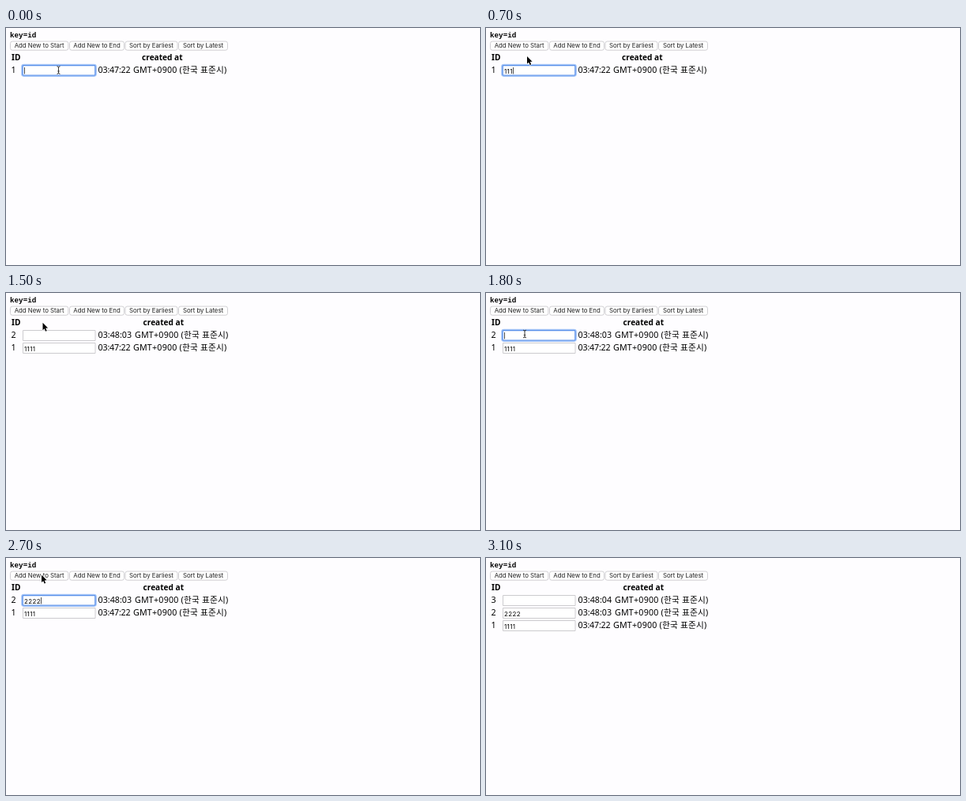
An HTML page with a canvas that plays this animation: 600 px wide and 301 px high, repeating every 4.1 s.

```html
<!DOCTYPE html>
<html lang="en">
<head>
<meta charset="utf-8">
<title>key=id</title>
<style>
  html, body { margin: 0; width: 100%; height: 100%; overflow: hidden; background: #fefdff; }
  canvas { display: block; width: 100vw; height: 100vh; }
</style>
</head>
<body>
<canvas id="stage"></canvas>
<script>
const W = 600, H = 301, LOOP = 4100;
const BG = '#fefdff';
const SANS = '"Noto Sans", "Noto Sans CJK KR", sans-serif';
const UI = 'Inter, sans-serif';
const BODY = '500 10.7px ' + SANS;
const HEAD = 'bold 10.1px ' + SANS;
const canvas = document.getElementById('stage');
const ctx = canvas.getContext('2d');
const scale = window.devicePixelRatio || 1;
canvas.width = Math.round(W * scale);
canvas.height = Math.round(H * scale);

const buttons = [
  ['Add New to Start', 5, 74.3],
  ['Add New to End', 80, 70],
  ['Sort by Earliest', 150.5, 67],
  ['Sort by Latest', 218, 63]
];

// Each row: id, time of day, x of the zone text
const rows = [
  { id: '1', time: '03:47:22', zoneX: 161, tracking: -0.2 },
  { id: '2', time: '03:48:03', zoneX: 163, tracking: 0 },
  { id: '3', time: '03:48:04', zoneX: 163, tracking: 0 }
];

// Start time, pointer kind, x, y
const pointer = [
  [0, 'beam', 66.5, 53.5], [300, 'beam', 66, 53], [400, 'beam', 63, 52],
  [500, 'arrow', 58, 45], [600, 'arrow', 54, 39], [700, 'arrow', 52, 36],
  [800, 'arrow', 50, 33], [900, 'arrow', 47, 27], [1000, 'arrow', 45, 23],
  [1100, 'arrow', 45, 21.6], [1500, 'arrow', 46.5, 37.8], [1600, 'arrow', 48, 45],
  [1700, 'beam', 49, 52], [2400, 'beam', 49, 49], [2500, 'arrow', 48, 39],
  [2600, 'arrow', 46, 28], [2700, 'arrow', 45, 21.6], [3100, 'none', 0, 0]
];

// Start times of the typed digits, by row
const keys = [[400, 500, 700, 900], [2000, 2200, 2300, 2400], []];

const ADD_2 = 1200, ADD_3 = 2900, PRESS = 2800;

function text(str, x, y, font, { color = '#000', align = 'left', tracking = 0 } = {}) {
  ctx.font = font;
  ctx.fillStyle = color;
  ctx.textAlign = align;
  ctx.letterSpacing = tracking + 'px';
  ctx.fillText(str, x, y);
}

function box(x, y, w, h, r, fill, stroke, line = 1) {
  ctx.beginPath();
  ctx.roundRect(x, y, w, h, r);
  if (fill) { ctx.fillStyle = fill; ctx.fill(); }
  if (stroke) { ctx.strokeStyle = stroke; ctx.lineWidth = line; ctx.stroke(); }
}

function drawButton([label, x, w], pressed) {
  box(x + 0.5, 17, w - 1, 11.2, 2.6, pressed ? '#4a90f5' : '#fff', pressed ? '#3478e0' : '#c6c5c8', 0.8);
  text(label, x + w / 2, 25.2, '7.8px ' + UI, { color: pressed ? '#fff' : '#222', align: 'center' });
}

function drawInput(y, value, focused) {
  if (focused) {
    box(20.5, y, 93, 13.6, 2, null, '#a3c4f7', 2.6);
    box(21.2, y + 0.6, 91.6, 12.4, 0.8, '#fff', '#5c92ea', 1.2);
  } else {
    box(21.5, y + 0.5, 91.5, 13, 0, '#fff', '#cccbce', 1);
  }
  text(value, 23, y + 10.5, '8px ' + UI, { tracking: 0.35 });
  if (focused) {
    const x = 23.2 + ctx.measureText(value).width;
    ctx.fillStyle = '#222';
    ctx.fillRect(x, y + 3, 0.8, 8.4);
  }
}

function drawRow(row, slot, value, focused) {
  const y = slot * 16.2, base = 56.7 + y;
  text(row.id, 6.6, base, BODY);
  drawInput(47 + Math.round(y), value, focused);
  text(row.time, 116.6, base, BODY, { tracking: row.tracking });
  text('GMT+0900 (한국 표준시)', row.zoneX, base, BODY, { tracking: 0.2 });
}

function drawArrow(x, y) {
  const shape = [[0, 0], [0, 9.4], [2.1, 7.4], [3.6, 10.9], [5.2, 10.2], [3.7, 6.8], [6.6, 6.7]];
  ctx.beginPath();
  shape.forEach(([dx, dy]) => ctx.lineTo(x + dx, y + dy));
  ctx.closePath();
  ctx.lineJoin = 'round';
  ctx.strokeStyle = '#fff';
  ctx.lineWidth = 1.4;
  ctx.stroke();
  ctx.fillStyle = '#000';
  ctx.fill();
}

function drawBeam(x, y) {
  ctx.beginPath();
  ctx.moveTo(x - 2, y - 4.8);
  ctx.quadraticCurveTo(x, y - 4.8, x, y - 3.4);
  ctx.lineTo(x, y + 3.4);
  ctx.quadraticCurveTo(x, y + 4.8, x - 2, y + 4.8);
  ctx.moveTo(x + 2, y - 4.8);
  ctx.quadraticCurveTo(x, y - 4.8, x, y - 3.4);
  ctx.moveTo(x, y + 3.4);
  ctx.quadraticCurveTo(x, y + 4.8, x + 2, y + 4.8);
  ctx.moveTo(x - 1.2, y + 1.4);
  ctx.lineTo(x + 1.2, y + 1.4);
  ctx.strokeStyle = '#222';
  ctx.lineWidth = 0.9;
  ctx.stroke();
}

function draw(t) {
  ctx.setTransform(canvas.width / W, 0, 0, canvas.height / H, 0, 0);
  ctx.fillStyle = BG;
  ctx.fillRect(0, 0, W, H);

  text('key=id', 5, 12.3, 'bold 9.28px "Liberation Mono", monospace');
  buttons.forEach((b, i) => drawButton(b, i === 0 && t >= PRESS && t < ADD_3));
  text('ID', 7, 40.5, HEAD);
  text('created at', t < ADD_2 ? 197.8 : 199.3, 40.5, HEAD, { align: 'center' });

  const count = t < ADD_2 ? 1 : t < ADD_3 ? 2 : 3;
  const focus = t < ADD_2 ? 0 : t >= 1800 && t < PRESS ? 1 : -1;
  for (let i = 0; i < count; i++) {
    const typed = keys[i].filter(k => t >= k).length;
    drawRow(rows[i], count - 1 - i, rows[i].id.repeat(typed), focus === i);
  }

  const [, kind, x, y] = pointer.findLast(p => t >= p[0]);
  if (kind === 'arrow') drawArrow(x, y);
  if (kind === 'beam') drawBeam(x, y);
}

const start = performance.now();
function tick() {
  draw((performance.now() - start) % LOOP);
  requestAnimationFrame(tick);
}
tick();
</script>
</body>
</html>
```
